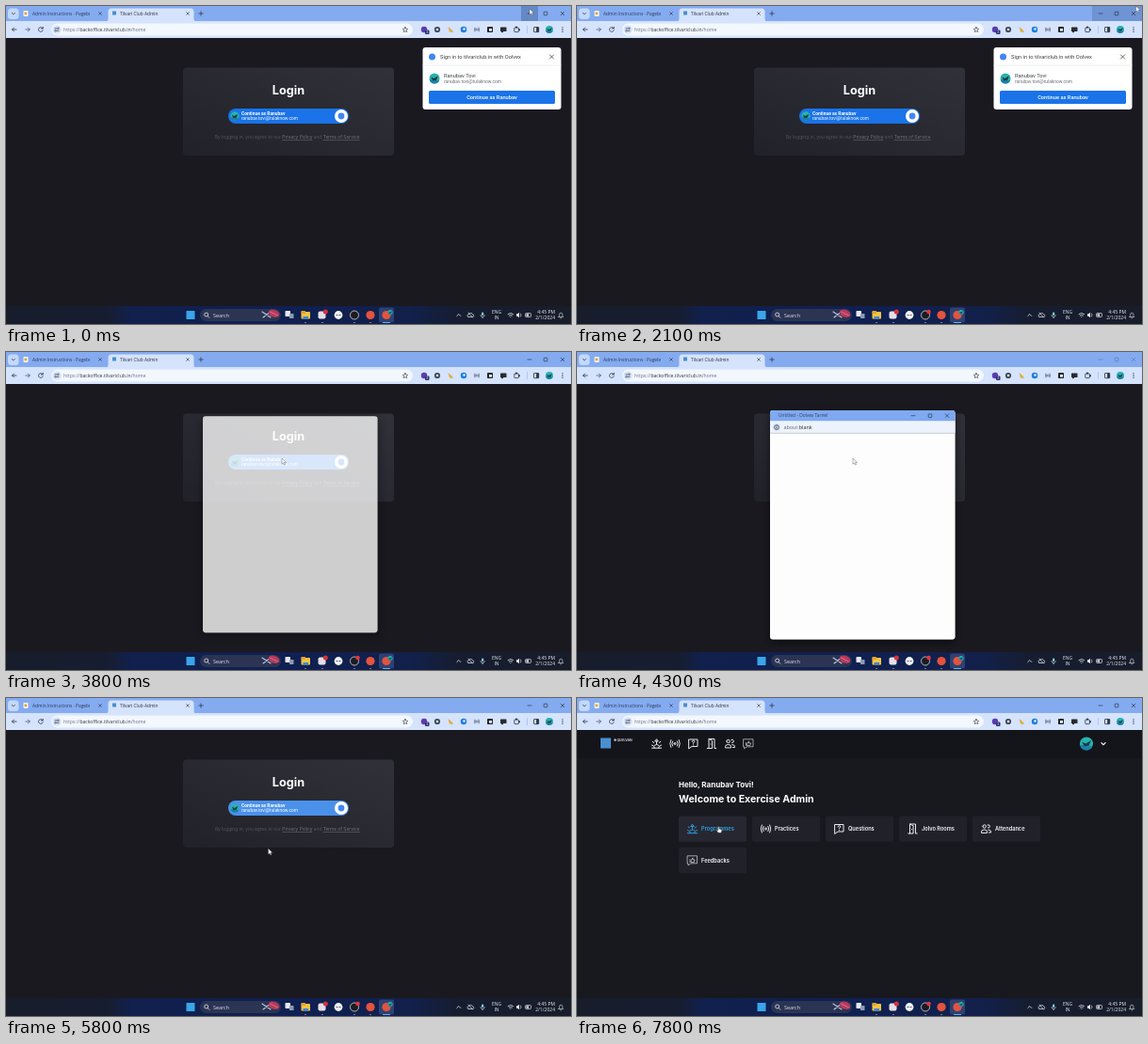
An HTML page that plays this animation: 600x338 px, repeating every 8 s.

```html
<!DOCTYPE html>
<html lang="en">
<head>
<meta charset="utf-8">
<title>Login walkthrough</title>
<style>
html, body { margin: 0; width: 100%; height: 100%; overflow: hidden; background: #1a1920; }
svg { display: block; width: 100vw; height: 100vh; }
text { white-space: pre; }
.ui { font-family: "Open Sans", "Noto Sans", sans-serif; }
.rb { font-family: Roboto, Arial, sans-serif; }
.in { font-family: Inter, Arial, sans-serif; }
</style>
</head>
<body>
<svg id="stage" viewBox="0 0 600 338" preserveAspectRatio="none"></svg>
<script>
const LOOP = 8000, STEP = 100;
const NAME = "Ranubav Tovi", FIRST = "Ranubav", MAIL = "ranubav.tovi@tulaknow.com";
const SITE = "tilvariclub.in", BRAND = "Oolvex";

// Markup helpers
const rect = (x, y, w, h, fill, r = 0, extra = "") =>
  `<rect x="${x}" y="${y}" width="${w}" height="${h}" fill="${fill}" rx="${r}" ${extra}/>`;
const dot = (x, y, r, fill, extra = "") => `<circle cx="${x}" cy="${y}" r="${r}" fill="${fill}" ${extra}/>`;
const line = (d, color, w = 0.8) =>
  `<path d="${d}" fill="none" stroke="${color}" stroke-width="${w}" stroke-linecap="round" stroke-linejoin="round"/>`;
const text = (x, y, str, size, fill, font = "ui", extra = "") =>
  `<text x="${x}" y="${y}" font-size="${size}" fill="${fill}" class="${font}" ${extra}>${str}</text>`;
const group = (id, body, extra = "") => `<g id="${id}" ${extra}>${body}</g>`;
const at = (x, y, body, scale = 1) => `<g transform="translate(${x} ${y}) scale(${scale})">${body}</g>`;
const MID = 'text-anchor="middle"', END = 'text-anchor="end"';
const weight = w => `font-weight="${w}"`;

const cross = (x, y, s, color, w = 0.7) =>
  line(`M${x - s} ${y - s}l${2 * s} ${2 * s}M${x + s} ${y - s}l${-2 * s} ${2 * s}`, color, w);
const chevron = (x, y, s, color, w = 0.9) => line(`M${x - s} ${y - s / 2}l${s} ${s} ${s} ${-s}`, color, w);
const windowButtons = (xs, y, color) =>
  line(`M${xs[0] - 2} ${y}h4`, color, 0.6) +
  rect(xs[1] - 1.8, y - 1.8, 3.6, 3.6, "none", 0.4, `stroke="${color}" stroke-width=".6"`) +
  cross(xs[2], y, 1.8, color, 0.6);
const avatar = (x, y, r) => at(x, y,
  dot(0, 0, 1, "#27b3ae") +
  `<path d="M-.95 .3Q-.4 0 .1 .25T.95 .3A1 1 0 0 1-.95 .3" fill="#1c7fa6"/>` +
  `<path d="M-.7-.3L-.1 0 .7-.5 .4 .3-.3 .4Z" fill="#173a48"/>`, r);
const tune = (x, y) => dot(x, y, 4.6, "#d3e2fb") +
  line(`M${x - 2} ${y - 1.2}h2.2M${x - 0.2} ${y + 1.3}h2.2`, "#333", 0.7) +
  dot(x + 1.5, y - 1.2, 0.8, "none", 'stroke="#333" stroke-width=".6"') +
  dot(x - 1.5, y + 1.3, 0.8, "none", 'stroke="#333" stroke-width=".6"');

// Section icons, centred on 0,0
const icons = {
  rise: "M-5 4.700h10M-5 1.500q2.600 .3 3 3M5 1.500q-2.600 .3-3 3M-2.200 1.800q2.200-2.200 4.400 0M0 .6v-3M-1.500-2.800l1.500-2 1.500 2zM-4.300-2.200l1.600 1.300M4.300-2.200l-1.600 1.300",
  radio: "M-1 0a1 1 0 1 0 2 0a1 1 0 1 0-2 0M-2.400-2.500q-1.800 2.500 0 5M2.400-2.500q1.800 2.500 0 5M-4.200-4q-2.200 4 0 8M4.200-4q2.200 4 0 8",
  ask: "M-4.500-4.500h9v7.500h-6l-3 2.200zM-1.300-2q0-1.300 1.300-1.300t1.300 1.200q0 .8-1.300 1.300v.6M0 1.400v.1",
  door: "M-4.700 5h1.700v-10h6v10h1.700M-3-5l3.600 1.800v8.200l-3.600 0M-1 .4v.2",
  people: "M-3.600-2.500a1.700 1.700 0 1 0 3.400 0a1.700 1.700 0 1 0-3.400 0M-5 4v-1q0-2 3-2t3 2v1zM1.500-4a1.600 1.600 0 1 1 .6 3M2.300 1q2.700 .2 2.700 2v1h-2",
  thumb: "M-5-4.700h10v8h-6.500l-3 2v-2h-.5zM-2.500-1v3M-1 2h2.800l.8-2.600h-2.200l.1-2-1.500 2.100z"
};
const icon = (name, x, y, color = "#f4f4f6", s = 1, w = 0.9) => at(x, y, line(icons[name], color, w), s);

function browser() {
  const ink = "#27303f";
  const puzzle = rect(539.8, 23, 4.6, 4.6, "none", 0.6, `stroke="${ink}" stroke-width=".8"`) +
    dot(542, 22.6, 1, ink) + dot(545, 25.3, 1, ink);
  return rect(0, 0, 600, 17, "#84abf0") + rect(2, 2.5, 11.5, 11.5, "#c3d8fb", 3.5) +
    chevron(7.8, 8.2, 1.5, ink, 0.8) +
    rect(18.5, 5, 5, 6, "#f6f2e4", 0.8) + rect(19.6, 6.6, 2.4, 2.6, "#d9a23c") +
    `<svg x="28" y="0" width="61" height="16">${text(0, 10, "Admin Instructions · Pagebrook", 4.8, "#2c3a57")}</svg>` +
    cross(100, 8, 1.4, ink, 0.6) +
    `<path d="M105 17Q108.500 17 108.500 13V6Q108.500 2.500 112 2.500H196Q199.500 2.500 199.500 6V13Q199.500 17 203 17Z" fill="#d5e3fc"/>` +
    rect(113, 5.5, 4, 4, "#4a8fd0") + text(121, 10, "Tilvari Club Admin", 4.8, "#2a2e37") +
    cross(193, 8, 1.4, ink, 0.6) + line("M204.800 8h4.400M207 5.800v4.400", ink, 0.7) +
    rect(0, 16, 600, 18, "#d5e3fc") +
    line("M11 25H6.500M8.500 23l-2 2 2 2", ink) + line("M20.800 25h4.500M23.300 23l2 2-2 2", "#4c5a72") +
    line("M39 23.800a2.400 2.400 0 1 0 .2 2M39.200 22.300v1.700h-1.700", ink) +
    rect(48, 18.5, 384, 13, "#f3f7fe", 6.5) + tune(54, 25) +
    text(61, 27, `<tspan fill="#6d737e">https://</tspan>backoffice.${SITE}<tspan fill="#6d737e">/home</tspan>`, 5.1, "#33373e") +
    at(424, 25, line("M0-2.600l.8 1.700 1.900 .3-1.400 1.300 .4 1.900L0 1.700l-1.700 .9 .4-1.900-1.400-1.300 1.900-.3z", ink, 0.6)) +
    dot(444, 25, 3.2, "#5a3db0") + rect(445, 25.5, 4.5, 4.5, "#2c2d73", 1) + text(447.2, 29.2, "2", 3.7, "#fff", "rb", MID) +
    dot(458, 25, 3.1, "#3d4655") + dot(458, 25, 1.3, "#d5e3fc") +
    at(472, 25, `<path d="M-2.500-3l4 3.500 1.500 2.500-4-.5z" fill="#e0ac35"/>`) +
    dot(486, 25, 3.2, "#1d7de2") + dot(486.5, 24.5, 1.2, "#e6f1ff") +
    icon("radio", 500, 25, ink, 0.52) +
    rect(511, 22, 6, 6, "#20242b", 0.8) + rect(513, 24, 3, 2.7, "#e8eefc") +
    rect(525, 22.5, 6.5, 4.5, "#282b30", 0.6) + dot(527, 27, 1.2, "#282b30") +
    puzzle + line("M553.500 21.500v7", "#93b5ef", 0.6) +
    rect(560.5, 22.5, 5.2, 5.2, "none", 0.5, `stroke="${ink}" stroke-width=".8"`) + rect(563.2, 22.5, 2.5, 5.2, ink) +
    avatar(577, 25, 4) + [22.8, 25, 27.2].map(y => dot(591, y, 0.65, ink)).join("") +
    group("hover", rect(547, 0, 18, 16, "#6589c6")) +
    group("hoverAll", rect(547, 0, 53, 16, "#6f94d4")) +
    group("controls", windowButtons([556, 573, 591], 8, "#1b2331"));
}

function taskbar() {
  const w = "#e7eaf1";
  return rect(0, 319, 600, 19, "url(#bar)") +
    rect(191.5, 324, 9, 9, "#3ba5ea", 0.6) +
    rect(206, 322, 86, 13, "#2b3453", 6.5) +
    dot(212.7, 328, 2, "none", `stroke="${w}" stroke-width=".8"`) + line("M214.200 329.600l1.700 1.700", w) +
    text(220, 330.6, "Search", 5.4, "#dfe3ec") +
    line("M272 325l9 6M281 325l-8 6", "#b9c7dc", 1.1) +
    `<ellipse cx="284.500" cy="326.800" rx="6" ry="4" fill="#b53a5c" transform="rotate(18 284.500 326.800)"/>` +
    line("M280.500 325l8 4", "#e2738c", 0.9) +
    rect(296.5, 324, 5.5, 6, w, 0.7) + rect(301, 327, 4.5, 5, "#8e9bb0", 0.6) +
    rect(313.5, 325, 9.5, 7.5, "#f5c344", 0.8) + rect(313.5, 324, 4.5, 3, "#e3a52e", 0.6) + rect(315.5, 330, 5.5, 2.5, "#3c86d8") +
    rect(331.5, 324.5, 8, 8, "#e6dfe8", 2) + dot(339.3, 325, 2.5, "#d6323c") +
    dot(353, 328.5, 4.4, "#f1f2f4") + line("M351 328.500h1M354 328.500h1", "#555", 1) +
    dot(370, 328.5, 4.5, "#1b1c20", 'stroke="#d8dade" stroke-width=".8"') +
    group("rec", dot(373.5, 325, 2.3, "#e23440")) +
    rect(396, 320.5, 16, 16, "#2d4273", 2) +
    dot(387, 328.5, 4.6, "#e5533d") + dot(404, 328.5, 4.6, "#e5533d") + avatar(408, 325.5, 2.6) +
    [318, 336, 370, 387].map(x => rect(x - 1.2, 336, 2.4, 0.8, "#8f98a8", 0.4)).join("") +
    rect(400, 336, 8, 1, "#69b4f2", 0.5) +
    line("M478.800 329.500l2-2 2 2", w) +
    line("M491 330.500h4.500a1.300 1.300 0 0 0 0-2.600 2 2 0 0 0-3.800-.3 1.500 1.500 0 0 0-.7 2.900M491 326l4.500 5", w, 0.7) +
    rect(505, 325.5, 2.2, 3.6, "#7fd0d8", 1.1) + line("M503.900 328.500q0 2 2.200 2t2.200-2M506.100 330.500v1.300", w, 0.6) +
    text(521, 327.2, "ENG", 5, w, "ui", MID) + text(521, 333.4, "IN", 5, w, "ui", MID) +
    line("M533 327.500q2.800-2.400 5.600 0M534.200 329q1.600-1.400 3.200 0M535.800 330.500h.1", w, 0.8) +
    `<path d="M542 327.300h1.300l1.700-1.600v5.600l-1.700-1.600H542z" fill="${w}"/>` + line("M546.500 327q1.200 1.500 0 3", w, 0.7) +
    rect(551.5, 326.5, 6, 4, "none", 0.9, `stroke="${w}" stroke-width=".7"`) + rect(552.4, 327.4, 2.8, 2.2, w) +
    text(583, 327.2, "4:45 PM", 5, w, "ui", END) + text(583, 333.4, "2/1/2024", 5, w, "ui", END) +
    line("M586.800 330.500h5l-.9-1.300v-1.400a1.600 1.600 0 0 0-3.200 0v1.400zM588.800 331.800h1", w, 0.6);
}

function login() {
  return rect(188, 65.5, 224, 93.5, "url(#card)", 4) +
    text(300, 94, "Login", 12.7, "#fff", "in", `${MID} ${weight(700)}`) +
    `<rect id="button" x="236" y="109" width="128" height="16" rx="8"/>` +
    avatar(243, 117, 4.7) +
    text(250, 115.9, `Continue as ${FIRST}`, 4.9, "#fff", "rb", weight(700)) +
    text(250, 121.4, MAIL, 4.8, "#fff", "rb") +
    dot(356, 117, 7, "#fff") + dot(356, 117, 3.4, "#4285f4") +
    text(299.5, 141.4, 'By logging in, you agree to our <tspan text-decoration="underline" fill="#73747d">Privacy Policy</tspan> and <tspan text-decoration="underline" fill="#73747d">Terms of Service</tspan>.', 4.85, "#54555e", "in", MID);
}

function oneTap() {
  return rect(442.5, 44, 147, 66, "#fff", 3) + dot(452.5, 54, 3.5, "#4285f4") +
    text(461, 56, `Sign in to ${SITE} with ${BRAND}`, 5.7, "#3c4043", "rb") +
    cross(579.5, 54, 2.1, "#444", 0.8) + line("M442.500 63.200h147", "#dadce0", 0.5) +
    avatar(455, 77, 5.5) +
    text(465, 75.8, NAME, 5.7, "#3c4043", "rb") + text(465, 82.4, MAIL, 4.9, "#6b7075", "rb") +
    rect(449, 90, 134, 14, "#1a73e8", 1.5) +
    text(516, 99, `Continue as ${FIRST}`, 5.7, "#fff", "rb", `${MID} ${weight(500)}`);
}

function popupWindow() {
  const grey = "#5f6368";
  const blank = text(214, 69.2, `Untitled - ${BRAND} Tarnel`, 4.8, "#33415e") +
    dot(212, 80, 4, "#d3e2fb") + dot(212, 80, 2.4, "none", 'stroke="#333" stroke-width=".7"') + line("M212 79.800v1.300M212 78.700v.05", "#333", 0.7) +
    text(219.5, 82, "about:<tspan fill='#202124'>blank</tspan>", 5.4, grey);
  const chooser = rect(208, 65, 4.5, 4.5, "#f3f6fc", 0.6) + dot(210.2, 67.2, 1.5, "#4285f4") +
    text(214, 69.2, `Sign In - ${BRAND} Accounts - ${BRAND} Tarnel`, 4.8, "#33415e") + tune(212, 80) +
    text(219.5, 82, `<tspan fill="${grey}">https://</tspan>accounts.oolvex.com<tspan fill="${grey}">/gsi/select?client_id=903715264408-h4mtq...</tspan>`, 5.2, "#33373e") +
    dot(218, 97, 3.7, "#4285f4") + text(227, 99, `Sign in with ${BRAND}`, 6.6, "#5f6368", "rb") +
    line("M205.500 107.500h191", "#dfe1e5", 0.6) +
    text(300, 130, "Choose an Account", 9.5, "#202124", "rb", MID) +
    text(300, 141.5, `to continue to ${SITE}`, 6.2, "#202124", "rb", MID) +
    avatar(227, 163.5, 5.6) +
    text(237, 162.6, NAME, 5.7, "#3c4043", "rb") + text(237, 169, MAIL, 4.9, grey, "rb") +
    line("M221 176h159M221 194.500h159", "#e3e5e8", 0.6) +
    dot(226.5, 185, 3.3, "none", `stroke="${grey}" stroke-width=".7"`) + dot(226.5, 184, 1.1, "none", `stroke="${grey}" stroke-width=".6"`) +
    line("M224.400 187q2-1.600 4.200 0", grey, 0.6) +
    text(237, 187, "Use another account", 6, "#3c4043", "rb") +
    text(220.5, 292.4, "English", 4.9, "#3c4043", "rb") + `<path d="M238.800 289.800h3.400l-1.700 1.800z" fill="#444"/>` +
    text(281, 292.4, "Help", 4.8, "#777b80", "rb") + text(303, 292.4, "Privacy Policy", 4.8, "#777b80", "rb") +
    text(345, 292.4, "Terms of Service", 4.8, "#777b80", "rb") +
    rect(396, 87, 5.5, 217, "#f1f1f1") + rect(396.5, 94, 5, 185, "#b9babd") +
    `<path d="M397.500 91.300h3l-1.500-1.800zM397.500 301h3l-1.500 1.800z" fill="#666"/>`;
  return rect(205, 62, 196.5, 243.5, "#fdfdfe", 3, 'filter="url(#shadow)"') +
    `<path d="M205 73.500v-8.500q0-3 3-3h190.500q3 0 3 3v8.500z" fill="#7fa9f0"/>` +
    rect(205, 73.5, 196.5, 12.5, "#edf3fd") + line("M205.300 86.300h196", "#a3abb8", 0.6) +
    windowButtons([357, 375, 393], 67.7, "#1c2a44") +
    group("blank", blank) + group("chooser", chooser);
}

function dashboard() {
  const order = ["rise", "radio", "ask", "door", "people", "thumb"];
  const labels = ["Programmes", "Practices", "Questions", "Jolvo Rooms", "Attendance", "Feedbacks"];
  const stroke = name => name === "thumb" ? 0.6 : 0.95;
  const card = (label, i) => {
    const x = 108 + 78 * (i % 5), y = i < 5 ? 125.5 : 159;
    const face = (color, fill) => rect(x, y, 72, 27.3, fill, 2) +
      icon(order[i], x + 14.5, y + 13.5, color, 1, stroke(order[i])) +
      text(x + 24, y + 15.5, label, 5.65, color, "in", weight(600));
    const plain = face("#f6f6f8", "#21212a");
    return i ? plain : group("plain", plain) + group("lit", face("#2fa4e4", "#272731"));
  };
  return rect(0, 34, 600, 285, "#18181f") + rect(0, 34, 600, 30, "#14151b") +
    rect(25, 42.5, 11, 11, "#4a8fd0") + rect(39.5, 43.6, 2, 2, "#e8eaf0") + text(42.4, 46, "QUELVAN", 3.4, "#e8eaf0", "in", weight(600)) +
    order.map((name, i) => icon(name, 84.5 + 19.5 * i, 48.5, "#f4f4f6", 1, stroke(name))).join("") +
    avatar(541, 48.5, 7) + chevron(559, 48.7, 2.1, "#fff", 1.1) +
    text(108, 95, `Hello, ${NAME}!`, 8, "#fff", "in", weight(700)) +
    text(108, 111.2, "Welcome to Exercise Admin", 10.6, "#fff", "in", weight(700)) +
    labels.map(card).join("");
}

const defs = `<defs>
  <linearGradient id="card" x1="0" y1="1" x2="1" y2="0"><stop offset="0" stop-color="#212129"/><stop offset="1" stop-color="#303139"/></linearGradient>
  <linearGradient id="bar"><stop offset="0" stop-color="#181d2c"/><stop offset=".18" stop-color="#171d30"/><stop offset=".22" stop-color="#11204c"/><stop offset=".5" stop-color="#0f2052"/><stop offset=".72" stop-color="#12204a"/><stop offset=".8" stop-color="#161d30"/><stop offset="1" stop-color="#181d2a"/></linearGradient>
  <filter id="shadow" x="-20%" y="-20%" width="140%" height="140%"><feDropShadow dx="0" dy="3" stdDeviation="5" flood-opacity=".55"/></filter>
</defs>`;
const arrow = `<path d="M0 0V6.200L1.500 4.900 2.500 7 3.500 6.500 2.500 4.500H4.500Z" fill="#fff" stroke="#444" stroke-width=".4"/>`;
const hand = `<path d="M-.7 .5Q0-.5 .6 .5V2.500L3 3.200Q3.500 3.500 3.300 4.500L2.700 6.800H-.6L-2.200 4.400Q-2.200 3.500-1.300 3.900L-.7 4.500Z" fill="#fff" stroke="#222" stroke-width=".45"/>`;

document.getElementById("stage").innerHTML = defs + rect(0, 0, 600, 338, "#1a1920") + browser() +
  group("login", login()) + group("oneTap", oneTap()) + group("dashboard", dashboard()) + taskbar() +
  group("ghost", rect(205, 62, 196.5, 243.5, "#fff", 3, 'filter="url(#shadow)"')) + group("popup", popupWindow()) +
  group("cursor", group("arrow", arrow) + group("hand", hand));

const el = id => document.getElementById(id);
const show = (id, on) => { el(id).style.display = on ? "" : "none"; };
const clamp = v => Math.min(1, Math.max(0, v));
const ease = v => v * v * (3 - 2 * v);

// Pointer moves: start, end, from, to
const moves = [
  [2000, 2100, [556, 3], [593.5, 0]],
  [2100, 2900, [593.5, 0], [293, 113]],
  [4900, 5500, [293, 113], [278.5, 160]],
  [7200, 7800, [278.5, 160], [150.5, 136.5]]
];
function pointer(t) {
  let pos = moves[0][2];
  for (const [start, end, from, to] of moves) {
    if (t < start) break;
    const p = ease(clamp((t - start) / (end - start)));
    pos = from.map((v, i) => v + (to[i] - v) * p);
  }
  return pos;
}

function draw(t) {
  const home = t >= 6200, popup = t >= 3900 && t < 5800;
  const [x, y] = pointer(t);
  const overCard = home && x < 180;
  el("cursor").setAttribute("transform", `translate(${x} ${y})`);
  show("arrow", !overCard);
  show("hand", overCard);
  show("plain", !overCard);
  show("lit", overCard);

  show("hover", t < 2100);
  show("hoverAll", t >= 2100 && t < 2300);
  el("controls").style.opacity = popup ? 0.4 : 1;
  show("rec", t >= 300);

  show("login", !home);
  show("dashboard", home);
  show("oneTap", t < 3200);
  el("button").setAttribute("fill", t >= 2800 ? "#4a91ea" : "#1a73e8");

  const opening = (t - 3700) / 200, scale = 0.888 + 0.112 * clamp(opening);
  show("ghost", opening > 0 && opening < 1);
  el("ghost").style.opacity = clamp(1.58 * opening);
  el("ghost").setAttribute("transform", `translate(302 183) scale(${scale}) translate(-303.5 -183.5)`);
  show("popup", popup);
  el("popup").style.opacity = t >= 5700 ? 0.5 : 1;
  show("blank", t < 4600);
  show("chooser", t >= 4600);
}

function tick(now) {
  draw(Math.floor((now % LOOP) / STEP) * STEP);
  requestAnimationFrame(tick);
}
draw(0);
requestAnimationFrame(tick);
</script>
</body>
</html>
```
